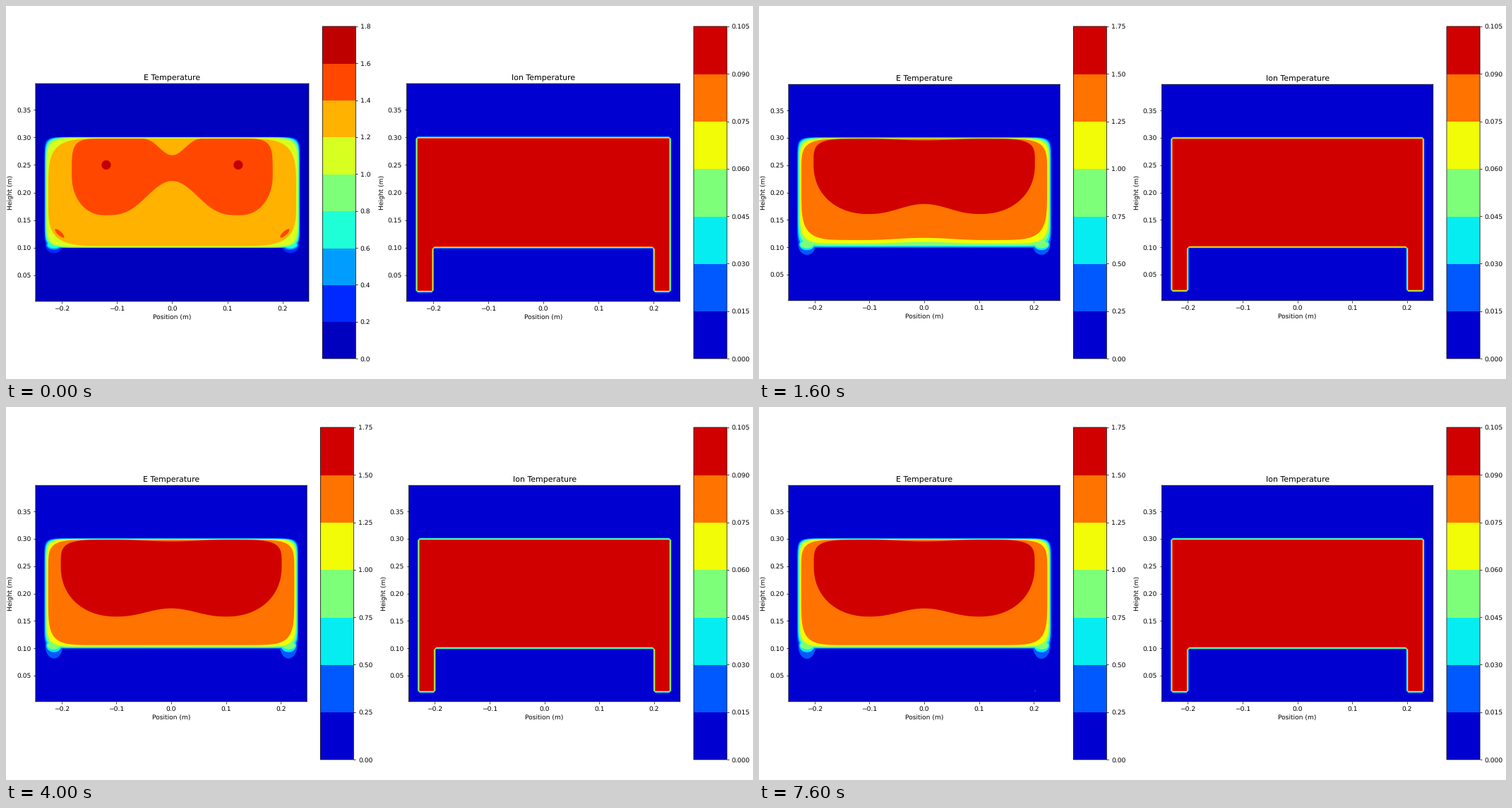
Write a matplotlib script that moves like this. It is 1058x529 px and loops after 8.6 s.

```python
import numpy as np
import matplotlib.pyplot as plt
from matplotlib.animation import FuncAnimation
from matplotlib.cm import ScalarMappable
from matplotlib.colors import BoundaryNorm, ListedColormap

W, H = 1058, 529
DPI = 66.125
TICK = 200          # ms per animation step
STATES = 20         # the last state is held longer
STEPS = 43

plt.rcParams.update({"font.family": "DejaVu Sans", "path.snap": False,
                     "text.hinting": "none"})
jet = plt.get_cmap("jet")


def basin(pit, low, lobe, wide, mid, power, top, notch=0):
    """Key sizes in mm of one mirrored contour: floor height at the centre and
    under the lobe, lobe x, widest x and its height, corner sharpness,
    ceiling height and the depth of its central notch."""
    return np.array([pit, low, lobe, wide, mid, power, top, notch], float)


OUTER = basin(99, 99, 110, 232, 200, 14, 301)

START_BULK = basin(102.8, 102.8, 110, 224.6, 190, 4, 297.7)
START_LOBES = basin(221, 158.8, 123, 182, 231, 2.1, 297.6, 30)

COOL_GREEN = basin(103.7, 103.7, 110, 226.5, 235, 6, 299.4)
COOL_LIME = basin(129.7, 115, 125, 222.7, 231, 2.6, 298.8)
COOL_ORANGE = basin(175.3, 151.2, 110.6, 215.8, 237, 2.2, 297.8, 1)
COOL_LOBES = basin(238.7, 177.8, 113, 192.3, 255, 2.1, 297.6, 28)

WARM_GREEN = basin(107.5, 107, 110, 228.5, 240, 5, 299.4)
WARM_YELLOW = basin(133.2, 120.4, 107, 226.5, 240, 2.4, 298.8)
WARM_ORANGE = basin(160, 140.8, 107, 223, 235, 2.2, 298.3)
WARM_CORE = basin(202.2, 171.5, 109.5, 203.5, 255, 2.1, 298.3, 3)

STEADY_ORANGE = basin(105.7, 105.7, 110, 224.5, 225, 6, 298.2)
STEADY_CORE = basin(172.8, 157.8, 100.6, 201.5, 249.4, 2.15, 298.3, 3)


def mix(a, b, w):
    return a + (b - a) * w


def shells(inner, weights):
    return [mix(OUTER, inner, w) for w in weights]


def settle(k, rate):
    return 1 - np.exp(-rate * (k - 2))


def dip(x, reach, depth):
    """Bump at x = 0 that fades out at reach; deeper ones are more pointed."""
    s = np.minimum(x / reach, 1)
    return depth * ((1 + np.cos(np.pi * s)) / 2) ** (1 + 0.01 * depth)


def quarter(a, b, power):
    t = np.linspace(0, np.pi / 2, 80)
    return a * np.sin(t) ** (2 / power), b * np.cos(t).clip(0) ** (2 / power)


def outline(shape):
    pit, low, lobe, wide, mid, power, top, notch = shape
    x = np.linspace(0, lobe, 50)
    ux, uy = quarter(wide - lobe, top - mid, max(power, 4.5))
    lx, ly = quarter(wide - lobe, mid - low, power)
    xs = np.concatenate([x, lobe + ux, lobe + lx[::-1], x[::-1]])
    ys = np.concatenate([top - dip(x, 110 - 1.8 * notch, notch), mid + uy,
                         mid - ly[::-1], low + dip(x, lobe, pit - low)[::-1]])
    return np.column_stack([np.append(xs, -xs[::-1]), np.append(ys, ys[::-1])])


def twins(x, y, a, b, tilt=0.0):
    """An ellipse and its mirror image."""
    s = np.linspace(0, 2 * np.pi, 60)
    u, v = a * np.cos(s), b * np.sin(s)
    c, d = np.cos(tilt), np.sin(tilt)
    p = np.column_stack([x + u * c - v * d, y + u * d + v * c])
    return [p, p * [-1, 1]]


def spark(k):
    """One flickering hot cell at a leg end."""
    rng = np.random.default_rng(k)
    x = rng.choice([-227.5, -202.5, 202.5, 227.5])
    r = rng.uniform(0.6, 1.5)
    return np.array([(x - r, 22.5), (x, 22.5 + r), (x + r, 22.5), (x, 22.5 - r)])


def regions(k):
    """Filled outlines per contour level, coldest first."""
    if k == 0:
        shapes = shells(START_BULK, [0, 0.14, 0.28, 0.42, 0.58, 1]) + [START_LOBES]
        leak = 10
    elif k == 1:
        shapes = shells(COOL_GREEN, [0, 0.33, 0.66, 1])
        shapes += [COOL_LIME, COOL_ORANGE, COOL_LOBES]
        leak = 14
    else:
        warm = [OUTER, mix(OUTER, WARM_GREEN, 0.45), WARM_GREEN, WARM_YELLOW,
                WARM_ORANGE, WARM_CORE]
        steady = shells(STEADY_ORANGE, [0, 0.2, 0.4, 0.62, 1]) + [STEADY_CORE]
        shapes = [mix(a, b, settle(k, 0.78)) for a, b in zip(warm, steady)]
        leak = mix(7.7, 19.2, settle(k, 0.38))

    levels = [[outline(s)] for s in shapes]
    # Heat leaking down into the legs.
    for i, share in enumerate([1, 0.38, 0.12]):
        levels[i] += twins(214, 105, 16 - 2 * i, 5 + leak * share)
    if k == 0:
        levels[-1] += twins(204, 126, 11, 3.6, 0.75)
    if k < 2:
        levels.append(twins(119.5 - 2 * k, 250 + k, *[8.4 + 19 * k] * 2))
    if k >= 7:
        levels[0].append(spark(k))
    return levels


def colours(n):
    return [jet((i + 0.5) / n) for i in range(n)]


def draw_ions(ax):
    x = -0.2475 + 0.005 * np.arange(100)
    y = 0.0025 + 0.005 * np.arange(80)
    gx, gy = np.meshgrid(np.abs(x), y)
    inside = (gx < 0.23) & (gy < 0.3) & ((gy > 0.1) | ((gx > 0.2) & (gy > 0.02)))
    for i, c in enumerate(colours(7)[1:], 1):
        ax.contourf(x, y, inside * 0.1, levels=[0.015 * i, 1], colors=[c], antialiased=True)


def panel(ax, title, n, step, fmt):
    ax.set_facecolor(colours(n)[0])
    ax.set_aspect("equal")
    ax.set_xlim(-0.2475, 0.2475)
    ax.set_ylim(0.0025, 0.3975)
    ax.set_title(title)
    ax.set_xlabel("Position (m)")
    ax.set_ylabel("Height (m)")
    levels = step * np.arange(n + 1)
    scale = ScalarMappable(BoundaryNorm(levels, n), ListedColormap(colours(n)))
    bar = fig.colorbar(scale, ax=ax, shrink=0.9, aspect=10, ticks=levels, format=fmt)
    bar.minorticks_off()


fig = plt.figure(figsize=(W / DPI, H / DPI), dpi=DPI, facecolor="white")
view = {}


def build(early):
    """Lay out both panels once, then freeze the positions."""
    fig.clear()
    fig.set_layout_engine("constrained")
    electron, ion = fig.subplots(1, 2)
    draw_ions(ion)
    scale = (9, 0.2, "%.1f") if early else (7, 0.25, "%.2f")
    panel(electron, "E Temperature", *scale)
    panel(ion, "Ion Temperature", 7, 0.015, "%.3f")
    fig.get_layout_engine().execute(fig)
    fig.set_layout_engine("none")
    view.update(early=early, ax=electron, n=scale[0])


def update(step):
    k = min(step // 2, STATES - 1)
    if view.get("early") != (k < 2):
        build(k < 2)
    ax = view["ax"]
    for patch in list(ax.patches):
        patch.remove()
    for colour, shapes in zip(colours(view["n"])[1:], regions(k)):
        for p in shapes:
            ax.fill(*(p.T / 1000), color=colour, linewidth=0)
    return ax.patches


build(True)
anim = FuncAnimation(fig, update, frames=STEPS, interval=TICK, repeat=True,
                     repeat_delay=0, blit=False)
plt.show()
```
